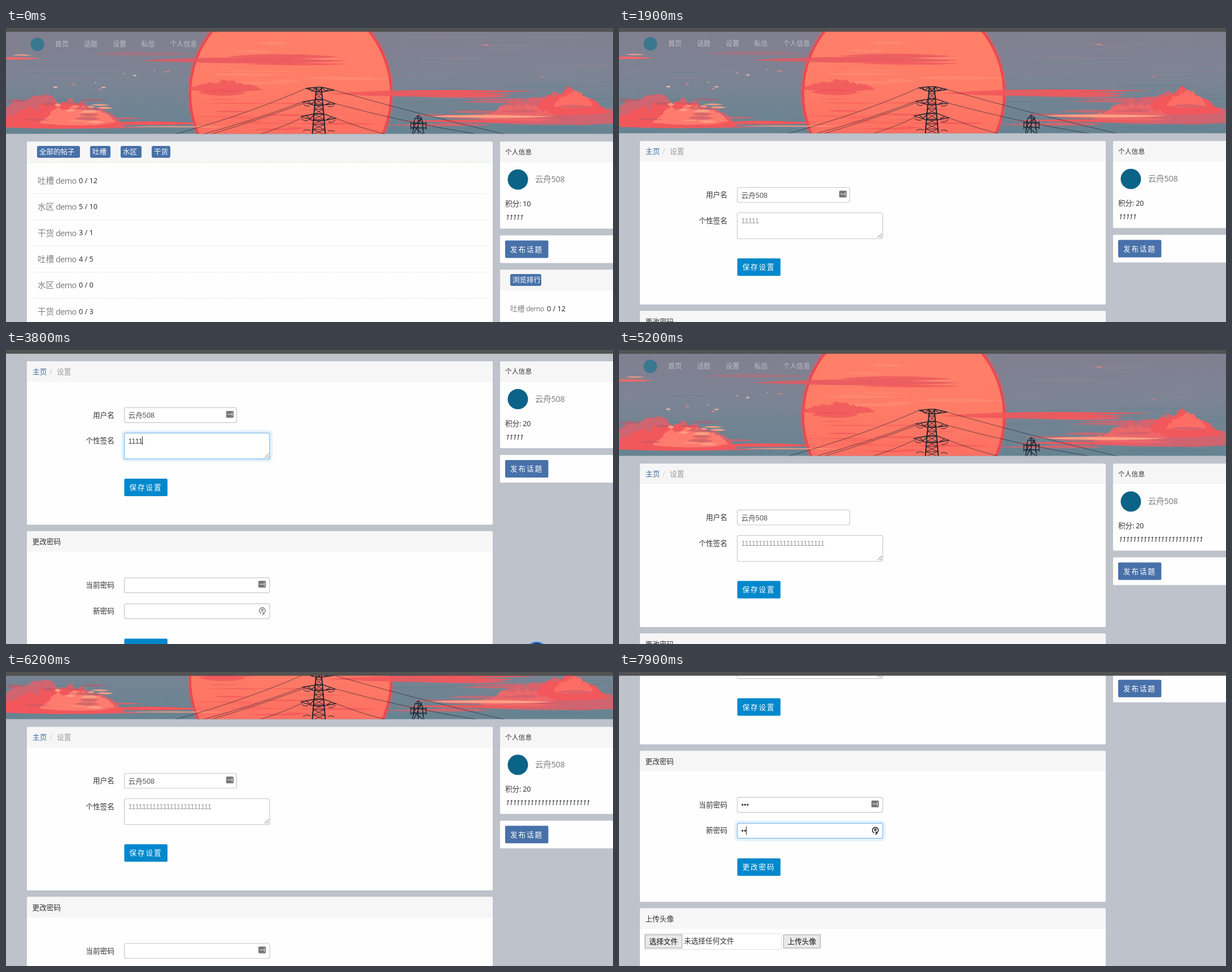
An HTML page that plays this animation: 1075 px wide and 521 px high, repeating every 8000 ms.

```html
<!DOCTYPE html>
<html lang="zh-CN">
<head>
<meta charset="utf-8">
<title>设置</title>
<style>
html, body { margin: 0; width: 100%; height: 100%; overflow: hidden; background: #bdc2cb; }
svg { display: block; }
text { font-family: 'Noto Sans', 'Noto Sans CJK SC', 'Noto Sans CJK', sans-serif; white-space: pre; }
.field { font-family: 'Liberation Sans', Arial, 'Noto Sans CJK SC', 'Noto Sans CJK', sans-serif; font-kerning: normal; }
</style>
</head>
<body>
<svg id="stage" width="1075" height="521"></svg>
<script>
const USER = '云舟508', BLUE = '#4871a9', SAVE = '#0088cc', LOOP = 8000;

// ---- drawing helpers; y of text is its vertical centre ----
const text = (x, y, s, size = 12.7, fill = '#333', extra = '') =>
  `<text x="${x}" y="${y + size * 0.37}" font-size="${size}" fill="${fill}" ${extra}>${s}</text>`;
const rect = (x, y, w, h, fill, extra = '') =>
  `<rect x="${x}" y="${y}" width="${w}" height="${h}" fill="${fill}" ${extra}/>`;
const path = (d, fill, extra = '') => `<path d="${d}" fill="${fill}" ${extra}/>`;
const group = (id, body, extra = '') => `<g id="${id}" ${extra}>${body}</g>`;

const panel = (x, y, w, h, head) =>
  rect(x, y, w, h, '#fefefe', 'rx="2"') + (head ? rect(x, y, w, 36.5, '#f6f6f7', 'rx="2"') : '');
const tag = (x, y, w, s) => rect(x, y, w, 21, BLUE, 'rx="3"') + text(x + 4, y + 10.5, s, 12.5, '#fff');
const button = (x, y, s, fill, id = '') =>
  rect(x, y, 76.5, 31, fill, `rx="2" id="${id}"`) + text(x + 9, y + 15.5, s, 12.7, '#fff', 'letter-spacing="1.8"');
const label = (y, s) => text(192, y, s, 12.7, '#333', 'text-anchor="end"');
const input = (id, y, w, h) =>
  rect(207, y - 2.5, w + 5, h + 5, 'none', `id="${id}Glow" rx="5" stroke="#52a8ec" stroke-width="5" opacity="0"`) +
  rect(209.5, y, w, h, '#fff', `id="${id}Box" rx="3" stroke="#c8c8c8" stroke-width="1.2"`);
const fieldText = (id, y) => text(216.5, y, '', 12.7, '#555', `id="${id}Text" class="field"`);
const caret = (id, y) => rect(0, y - 7.5, 1, 15, '#222', `id="${id}Caret"`);
const dotsIcon = (x, y) => rect(x, y, 13, 12, '#777', 'rx="1.5"') +
  [3, 5.5, 8].map(d => rect(x + d - 0.7, y + 5.2, 1.5, 1.5, '#fff')).join('') + rect(x + 10, y + 3, 1, 6, '#fff');
const keyIcon = (x, y) =>
  `<g id="key" stroke="#888" fill="none" stroke-width="1.6"><path d="M${x - 2} ${y + 4.5}A5.2 5.2 0 1 1 ${x + 2} ${y + 4.5}"/>` +
  `<path d="M${x} ${y + 2.5}l3 2.5-3 2.5M${x - 2} ${y}h4M${x - 1.2} ${y - 1}v-1.4h2.4v1.4"/></g>`;

// ---- banner ----
let seed = 7;
const rnd = () => (seed = (seed * 16807) % 2147483647) / 2147483647;
const streak = (x, y, w, h, fill, o = 1) =>
  path(`M${x} ${y}Q${x + w * 0.4} ${y - h} ${x + w} ${y}Q${x + w * 0.6} ${y + h * 0.8} ${x} ${y}Z`, fill, `opacity="${o}"`);
function cloud(x0, x1, base, h, fill, o = 1) {
  let d = `M${x0} ${base}`;
  for (let i = 1; i < 24; i++) {
    const t = i / 24;
    const y = base - h * Math.pow(Math.sin(Math.PI * t), 0.8) * (0.6 + 0.4 * rnd());
    d += `Q${(x0 + (x1 - x0) * (t - 0.02)).toFixed(1)} ${(y - 4).toFixed(1)} ${(x0 + (x1 - x0) * t).toFixed(1)} ${y.toFixed(1)}`;
  }
  return path(d + `L${x1} ${base}Q${(x0 + x1) / 2} ${base + 7} ${x0} ${base}Z`, fill, `opacity="${o}"`);
}
const scatter = (n, x0, x1, y0, y1, w, h, fill, o) => Array.from({ length: n }, () =>
  streak(x0 + rnd() * (x1 - x0), y0 + rnd() * (y1 - y0), w * (0.4 + rnd()), h * (0.4 + rnd()), fill, o)).join('');

function tower() {
  let d = '';
  const half = y => 4.5 + Math.max(0, y - 110) * 0.09;
  for (let y = 108; y < 188; y += 9) {
    const a = half(y), b = half(y + 9);
    d += `M${554 - a} ${y}L${554 + b} ${y + 9}M${554 + a} ${y}L${554 - b} ${y + 9}M${554 - a} ${y}h${2 * a}`;
  }
  const legs = `M549.5 106L${554 - half(188)} 188M558.5 106L${554 + half(188)} 188`;
  const arms = 'M531 107L550 105H560L581 110L560 113H548ZM525 131L548 127H562L583 134L560 137H546ZM522 157L547 152H562L584 160L562 164H545Z' +
    'M537 106l5 6 6-6 6 6 6-6 6 6 6-4M534 130l8 5 6-7M574 132l-8 4M531 155l8 6 7-8M576 158l-8 4';
  const hooks = 'M526 133q3 7 12 5M582 135q-3 6-12 4M523 159q3 7 12 5M583 162q-3 7-12 5M526 183q6-5 14-1M582 184q-6-4-12-1';
  const wires = 'M531 107Q430 152 300 188M525 131Q450 160 350 188M525 134Q450 162 364 188M522 160Q490 176 450 188' +
    'M581 110Q720 150 882 188M583 134Q700 166 832 188M584 160Q630 178 672 188';
  const mast = 'M724 160L720 188M736 160L740 188M730 156V188M717 169H744M718 177H744M717 166v14M722 165v16M738 165v16M744 166v14M724 160h12l-14 14 16 14M736 160l-14 28M726 158l4-3 5 3';
  const line = (p, w, o = 1) => path(p, 'none', `stroke="#20222d" stroke-width="${w}" opacity="${o}"`);
  return line(wires, 0.8, 0.8) + line(d, 0.9) + line(legs, 2) + line(arms, 1.3) + line(hooks, 1) + line(mast, 1.3);
}

function banner() {
  const red = '#f2575b', pink = '#e0616b', peach = '#ffa184';
  return `<svg y="6" width="1075" height="181.5" viewBox="0 6 1075 181.5">
  <defs><linearGradient id="sky" x2="0" y2="1"><stop stop-color="#817f90"/><stop offset=".45" stop-color="#7c8494"/><stop offset="1" stop-color="#668391"/></linearGradient>
  <linearGradient id="sun" x2="0" y2="1"><stop stop-color="#fd8069"/><stop offset=".45" stop-color="#ff7d67"/><stop offset="1" stop-color="#fa605c"/></linearGradient></defs>` +
  rect(0, 6, 1075, 182, 'url(#sky)') +
  scatter(16, -60, 1000, 12, 90, 190, 4, '#8d8492', 0.45) +
  scatter(14, -60, 1000, 80, 180, 190, 4, '#667e8d', 0.45) +
  '<circle cx="504" cy="117" r="184" fill="#d85e69" opacity=".35"/>' +
  '<circle cx="504" cy="117" r="178" fill="url(#sun)" stroke="#f0464f" stroke-width="4"/>' +
  scatter(9, 350, 540, 25, 100, 120, 5, '#ff917a', 0.55) +
  streak(235, 58, 370, 11, '#e6565e', 0.8) + streak(390, 51, 200, 9, '#eb5b60', 0.85) +
  streak(425, 64, 180, 5, red, 0.8) + streak(150, 46, 190, 8, '#b96c78', 0.5) +
  cloud(322, 455, 110, 17, '#ee555a', 0.75) + streak(340, 115, 85, 13, '#ee555a', 0.75) +
  scatter(14, 320, 570, 122, 180, 110, 3, '#f04f56', 0.6) +
  scatter(9, 620, 830, 108, 132, 150, 5, pink, 0.75) +
  streak(570, 117, 330, 12, red, 0.85) + streak(655, 112, 290, 4, red) +
  scatter(9, 640, 820, 142, 175, 170, 5, pink, 0.65) +
  scatter(6, 0, 160, 160, 178, 180, 5, pink, 0.8) +
  cloud(-45, 212, 174, 62, pink, 0.85) + cloud(-20, 208, 175, 46, red) +
  cloud(60, 196, 169, 38, '#ff8070', 0.9) + scatter(10, 75, 160, 135, 168, 30, 5, peach, 0.9) +
  scatter(9, -10, 150, 120, 170, 40, 5, '#b65a6b', 0.55) +
  streak(170, 169, 180, 7, red) + streak(215, 175, 180, 3, peach, 0.7) +
  streak(-30, 54, 92, 5, '#ee686b') + streak(10, 48, 36, 3, peach, 0.8) +
  cloud(845, 1105, 168, 60, pink, 0.85) + cloud(930, 1066, 151, 49, red) +
  cloud(970, 1040, 139, 30, '#ff7167', 0.9) + cloud(840, 980, 162, 30, '#ef696a', 0.9) +
  scatter(11, 860, 1030, 138, 172, 60, 5, '#d4616d', 0.8) +
  streak(745, 157, 225, 6, peach) + streak(690, 165, 250, 4, red) + streak(880, 178, 180, 9, '#628291') +
  scatter(7, 80, 270, 72, 112, 7, 3, '#efb5ad', 0.9) +
  path('M119 97q-1 5 5 4M164 110q4-4 5 0M845 31q6-3 10 1M280 77q5 2 9-1M945 88l7-2', 'none', 'stroke="#ee8982" stroke-width="1.3"') +
  tower() + '</svg>';
}

// ---- page ----
const navX = [87, 138, 189, 239.5, 290.5];
const nav = '<circle cx="55.5" cy="29" r="12" fill="#3a7890"/>' +
  ['首页', '话题', '设置', '私信', '个人信息'].map((s, i) => text(navX[i], 29, s, 12, '#c0bfc7', `id="nav${i}"`)).join('');

const topics = ['吐槽', '水区', '干货'];
const counts = ['0 / 12', '5 / 10', '3 / 1', '4 / 5', '0 / 0', '0 / 3'];
const demo = '<tspan letter-spacing="-.7"> demo</tspan>';
const dashed = (x, w, y) => path(`M${x} ${y}h${w}`, 'none', 'stroke="#e6e6e6" stroke-dasharray="2 1"');

const home = panel(37, 201.5, 825, 400, true) +
  path('M37 238.5H862', 'none', 'stroke="#c9eccb" stroke-dasharray="3 2"') +
  tag(55, 209, 76, '全部的帖子') + tag(149, 209, 36, '吐槽') + tag(203, 209, 37, '水区') + tag(258, 209, 33, '干货') +
  counts.map((c, i) => {
    const y = 270 + 46.4 * i;
    return text(56, y + 0.5, topics[i % 3] + demo, 14.5, '#808080') + text(129, y, c) + dashed(47, 805, y + 23.5);
  }).join('') +
  panel(875, 428.5, 225, 200, true) + tag(893, 436, 55, '浏览排行') + dashed(885, 200, 520.5) +
  text(893, 497, topics[0] + demo, 12.7, '#808080') + text(958, 497, counts[0]);

const sidebar = panel(875, 201.5, 225, 154, true) + text(884, 219.5, '个人信息', 11.8) +
  '<circle cx="906.5" cy="268.5" r="18" fill="#0b6387"/>' +
  text(937, 268, USER, 14.5, '#808080', 'letter-spacing="-.25"') +
  text(884, 311.5, '', 12.7, '#333', 'id="points" letter-spacing="-.2"') +
  text(885, 335.5, '', 12.3, '#333', 'id="sign" font-style="italic" letter-spacing="-.58"') +
  panel(875, 367.5, 225, 49) + button(884, 376.5, '发布话题', BLUE);

const fileButton = (x, w, s) => rect(x, 828.5, w, 23.5, '#e9e9e9', 'stroke="#a3a3a3"') + text(x + 7, 840.5, s, 12.7, '#111');
const settings = panel(37, 201.5, 825, 289.5, true) +
  text(47, 219.5, '主页', 12.7, '#3f6a9f') + text(77, 219.5, '/', 12.7, '#ccc') + text(90, 219.5, '设置', 12.7, '#999') +
  label(296.5, '用户名') + input('user', 283.5, 199, 26.5) + text(216.5, 297, USER, 12.7, '#555', 'class="field"') +
  label(342, '个性签名') + input('bio', 328.5, 257.5, 46) + fieldText('bio', 342.5) + caret('bio', 342) +
  path('M458 372.5l7.500-7.500M462.500 372.5l3-3', 'none', 'stroke="#666"') +
  button(209.5, 409.3, '保存设置', SAVE, 'save') +
  panel(37, 502.5, 825, 267.5, true) + text(46.500, 521, '更改密码') +
  label(598, '当前密码') + input('old', 585, 257.500, 26.5) + fieldText('old', 598.5) + caret('old', 598) +
  label(643.5, '新密码') + input('new', 631, 257.5, 26.5) + fieldText('new', 644.5) + caret('new', 644) +
  button(209.5, 693, '更改密码', SAVE) +
  panel(37, 781.5, 825, 200, true) + text(46.5, 800, '上传头像') +
  rect(45.5, 826.500, 242, 28, '#fff', 'rx="2" stroke="#ddd"') +
  fileButton(46.5, 65, '选择文件') + text(115, 839, '未选择任何文件') + fileButton(291.5, 65, '上传头像') +
  group('icons', dotsIcon(390, 289.3) + dotsIcon(447, 590.5) + keyIcon(454, 643.5));

document.getElementById('stage').innerHTML = rect(0, 0, 1075, 521, '#bdc2cb') +
  group('page', banner() + nav + sidebar + group('home', home) + group('settings', settings)) +
  '<circle id="orb" cx="940" cy="537" r="19" fill="#17263f" stroke="#3187dc" stroke-width="2.5"/>' +
  rect(0, 0, 1075, 6, '#535353') + rect(0, 5.5, 1075, 1, '#444');

// ---- timeline: each step changes part of the state ----
const start = { page: 'home', hover: -1, points: 10, sign: 5, scroll: 0, bio: 5, old: 0, new: 0,
  focus: '', glow: 0, fading: '', icons: false, orb: false, save: false, key: false };
const steps = [
  [200, { hover: 4 }], [400, { hover: 2 }],
  [1100, { page: 'settings', points: 20 }], [1200, { hover: -1 }], [1500, { icons: true }],
  [1700, { scroll: 1 }], [2000, { scroll: 48 }], [2100, { scroll: 94 }], [2200, { scroll: 181.4 }],
  [2500, { focus: 'bio', glow: 0.3, orb: true }], [2600, { glow: 0.7 }], [2700, { glow: 1 }],
  [3000, { bio: 0 }], [3100, { bio: 1 }], [3200, { bio: 2 }], [3400, { bio: 3 }], [3800, { bio: 4 }],
  ...[7, 10, 13, 16, 19, 22, 24].map((bio, i) => [3900 + 100 * i, { bio }]),
  [4600, { save: true }], [4700, { focus: '', fading: 'bio', glow: 0.4 }], [4800, { fading: '', glow: 0, orb: false }],
  [5200, { scroll: 0, sign: 24, icons: false, save: false }], [5400, { icons: true }],
  [5800, { scroll: 20 }], [5900, { scroll: 79 }], [6000, { scroll: 90.7 }],
  [6200, { scroll: 104 }], [6300, { scroll: 210 }], [6400, { scroll: 332 }], [6500, { scroll: 362.8 }],
  [6800, { focus: 'old', glow: 0 }], [6900, { glow: 0.6 }], [7000, { glow: 1, old: 1 }],
  [7200, { old: 2 }], [7300, { old: 3, key: true }],
  [7500, { focus: 'new', fading: 'old', glow: 0.4 }], [7600, { glow: 0.8 }], [7700, { fading: '', glow: 1 }],
  [7800, { new: 1 }], [7900, { new: 2 }]
];

const el = id => document.getElementById(id);
const set = (id, attrs) => { for (const k in attrs) el(id).setAttribute(k, attrs[k]); };
const show = (id, on) => set(id, { visibility: on ? 'inherit' : 'hidden' });

function drawField(id, s, char) {
  const on = s.focus === id, n = s[id], node = el(id + 'Text');
  const glow = on ? s.glow : s.fading === id ? 0.4 : 0;
  node.textContent = char.repeat(n);
  set(id + 'Text', { fill: id === 'bio' && !on ? '#999' : '#444' });
  set(id + 'Glow', { opacity: glow * 0.14 });
  set(id + 'Box', { stroke: glow > 0.5 ? '#7bb9ec' : glow ? '#a4c4dd' : '#c8c8c8' });
  show(id + 'Caret', on);
  if (on) set(id + 'Caret', { x: Math.round(216 + (n ? node.getComputedTextLength() : 0)) });
}

function draw(time) {
  const s = Object.assign({}, start);
  for (const [at, change] of steps) if (at <= time) Object.assign(s, change);
  set('page', { transform: `translate(0 ${-s.scroll})` });
  show('home', s.page === 'home');
  show('settings', s.page === 'settings');
  show('icons', s.icons);
  show('orb', s.orb);
  navX.forEach((_, i) => set('nav' + i, { fill: i === s.hover ? '#f4f4f6' : '#c0bfc7' }));
  el('points').textContent = '积分: ' + s.points;
  el('sign').textContent = '1'.repeat(s.sign);
  set('save', { fill: s.save ? '#006fab' : SAVE });
  set('key', { stroke: s.key ? '#222' : '#888' });
  drawField('bio', s, '1');
  drawField('old', s, '•');
  drawField('new', s, '•');
}

const origin = performance.now();
function tick() {
  draw((performance.now() - origin) % LOOP);
  requestAnimationFrame(tick);
}
tick();
</script>
</body>
</html>
```
